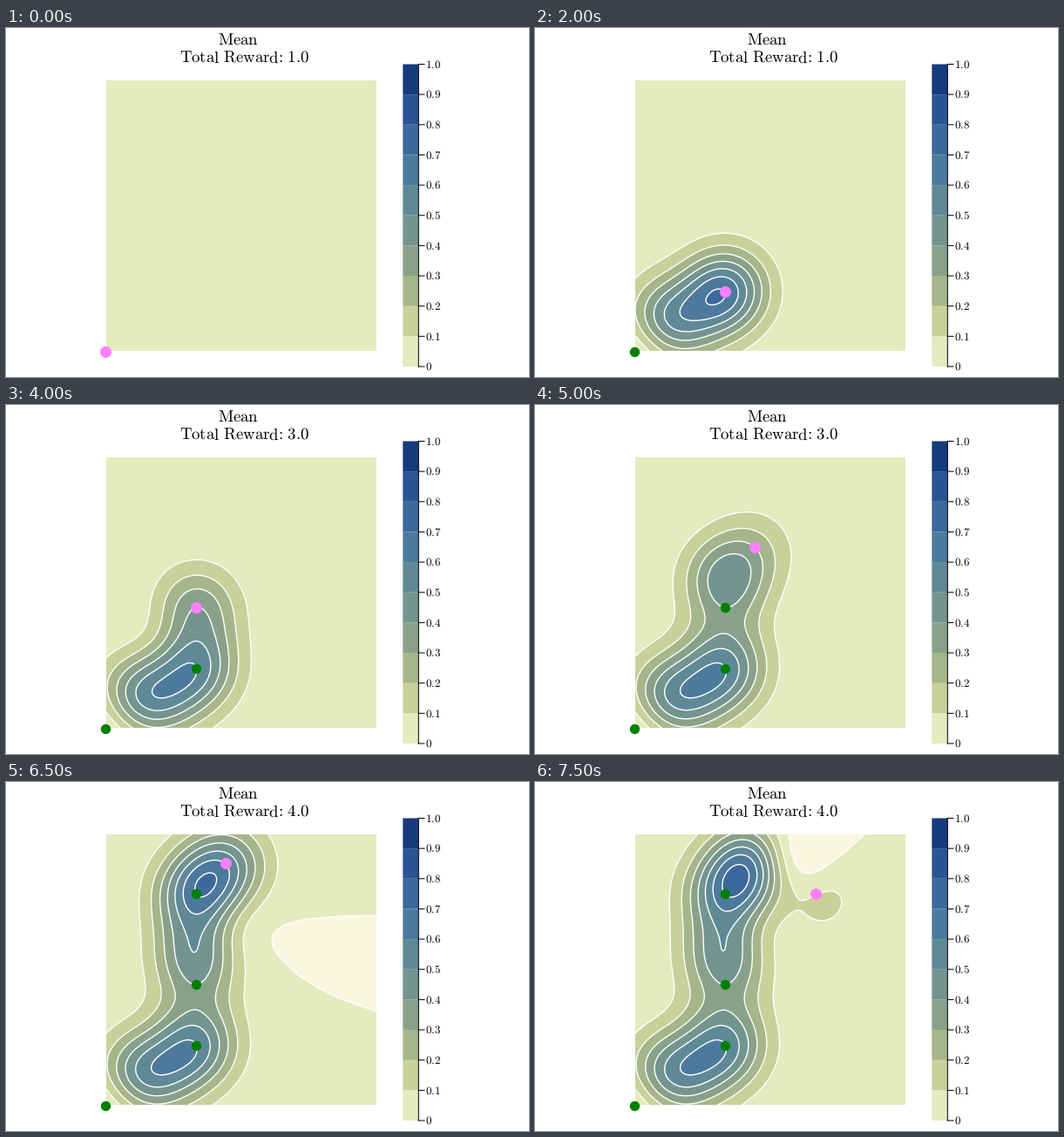
Animation, 600 px wide and 400 px high, one loop 8000 ms. Source, as a matplotlib script:

```python
import matplotlib.pyplot as plt
import numpy as np
from matplotlib.animation import FuncAnimation
from matplotlib.patches import Rectangle

plt.rcParams["mathtext.fontset"] = "cm"
plt.rcParams["text.hinting"] = "none"

W, H, DPI = 600, 400, 100
PT = 72 / DPI  # points per pixel
STEP_MS = 500
BANDS = ["#e6eabf", "#c8d19a", "#a6b68a", "#8aa189", "#74948f",
         "#5f8997", "#4d7a9c", "#3c699b", "#2a5493", "#173a7f"]
BELOW_ZERO = "#f8f8e1"
LEVELS = np.arange(11) / 10
SENSE_NOISE, DRILL_NOISE = 0.01, 1e-9

# One visit per step: grid x, grid y, reading, drilled
VISITS = [
    (0, 0, 0.0, True), (0, 0, 0.0, True), (1, 1, 0.5, False), (2, 1, 0.6, False),
    (3, 2, 0.7, False), (3, 2, 0.6, True), (2, 3, 0.3, False), (3, 4, 0.3, False),
    (3, 4, 0.4, True), (3, 5, 0.5, False), (4, 6, 0.3, False), (3, 7, 0.8, False),
    (3, 7, 0.7, True), (4, 8, 0.6, False), (5, 8, 0.1, False), (6, 7, 0.1, False),
]

px = np.linspace(115, 425, 311)
py = np.linspace(60, 370, 311)
grid_x, grid_y = np.meshgrid((px - 115) * 9 / 310, (370 - py) * 9 / 310)


def kernel(ax_, ay, bx, by):
    return np.exp(-((ax_ - bx) ** 2 + (ay - by) ** 2) / 2)


def posterior_mean(visits):
    """Gaussian process mean; a drilled reading replaces a sensed one."""
    sites = {(x, y): (value, DRILL_NOISE if drilled else SENSE_NOISE)
             for x, y, value, drilled in visits}
    sx, sy = np.array(list(sites), float).T
    values, noise = np.array(list(sites.values())).T
    cov = kernel(sx[:, None], sy[:, None], sx, sy) + np.diag(noise)
    weights = np.linalg.solve(cov, values)
    return sum(w * kernel(grid_x, grid_y, x, y) for w, x, y in zip(weights, sx, sy))


def marker_pos(x, y):
    return 113.8 + 34.66 * x, 371 - 34.7 * y


fig = plt.figure(figsize=(W / DPI, H / DPI), dpi=DPI, facecolor="white")
ax = fig.add_axes([0, 0, 1, 1])
ax.set_xlim(0, W)
ax.set_ylim(H, 0)
ax.axis("off")


def label(x, y, text, size, ha):
    return ax.text(x, y, text, fontsize=size * PT, ha=ha, va="baseline", color="black")


def marker(color, size, zorder):
    dot, = ax.plot([], [], "o", color=color, ms=size * PT, mew=0, zorder=zorder)
    dot.set_snap(False)
    return dot


def draw_colorbar():
    top, bottom = 41.5, 388
    band = (bottom - top) / 10
    for i, color in enumerate(BANDS):
        ax.add_patch(Rectangle((455.3, bottom - (i + 1) * band), 17.9, band,
                               facecolor=color, linewidth=0, snap=False))
    ax.plot([473.3, 473.3], [top, bottom], color="black", lw=PT, snap=False)
    for i, level in enumerate(LEVELS):
        y = bottom - i * band
        ax.plot([473.3, 480], [y, y], color="black", lw=PT, snap=False)
        text = f"{level:.1f}" if i else "0"
        label(480.9, y + 4, rf"$\mathrm{{{text}}}$", 12.9, "left")


draw_colorbar()
ax.add_patch(Rectangle((115, 60), 310, 310, facecolor=BANDS[0], linewidth=0))
label(266.5, 20, r"$\mathrm{Mean}$", 18.8, "center")
reward_text = label(273.7, 40, "", 18.8, "center")
drilled_dots = marker("#008000", 11.4, 5)
agent_dot = marker("#ff80ff", 13, 6)
contours = []


def clear_contours():
    while contours:
        contours.pop().remove()


def update(step):
    clear_contours()
    visits = VISITS[:step + 1]
    field = posterior_mean(visits)
    if field.any():
        contours.append(ax.contourf(px, py, field, levels=[-1, *LEVELS],
                                    colors=[BELOW_ZERO, *BANDS], zorder=2))
        contours.append(ax.contour(px, py, field, levels=LEVELS, colors="white",
                                   linewidths=1.4 * PT, linestyles="solid", zorder=3))
    drilled = sorted({(x, y) for x, y, _, done in visits if done})
    drilled_dots.set_data(*zip(*(marker_pos(*site) for site in drilled)))
    x, y = marker_pos(*visits[-1][:2])
    agent_dot.set_data([x], [y])
    reward_text.set_text(r"$\mathrm{Total\ Reward}\hspace{-0.2}:\hspace{0.133}"
                         rf"\mathrm{{{len(drilled)}.0}}$")
    return [drilled_dots, agent_dot, reward_text]


def init():
    return update(0)


anim = FuncAnimation(fig, update, frames=len(VISITS), init_func=init,
                     interval=STEP_MS, repeat=True, repeat_delay=0, blit=False)
plt.show()
```
